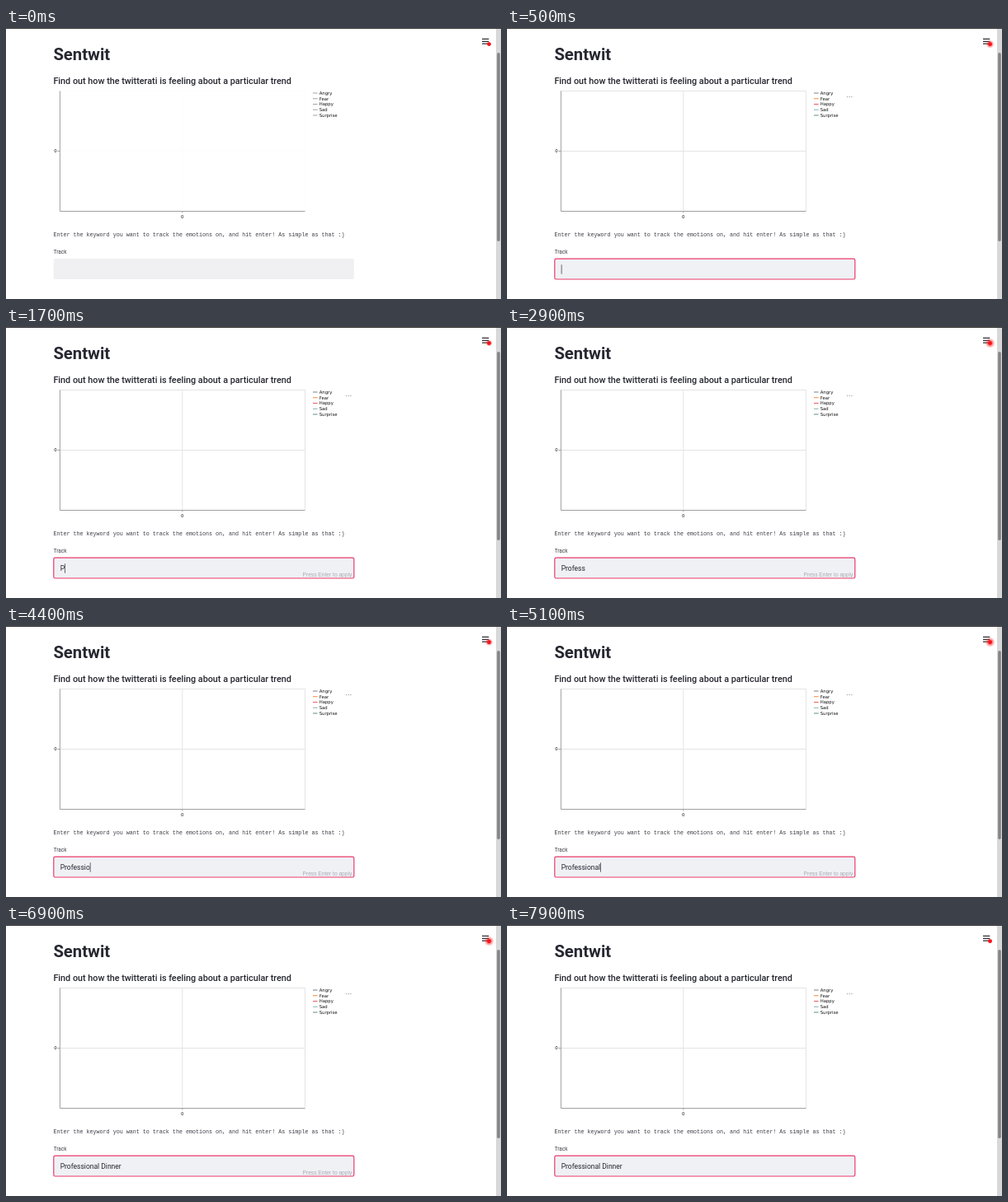
Animation, 600 px wide and 329 px high, one loop 8 s. Source, as an HTML page:

```html
<!DOCTYPE html>
<html lang="en">
<head>
<meta charset="utf-8">
<title>Sentwit</title>
<style>
  html, body { margin: 0; width: 100%; height: 100%; overflow: hidden; background: #fff; }
  svg { display: block; width: 600px; height: 329px; }
  text { fill: #262730; white-space: pre; font-family: Roboto, sans-serif; }
  .title { font-size: 20.3px; font-weight: 700; }
  .subtitle { font-size: 10.8px; font-weight: 500; }
  .prompt { font: 6.7px "Liberation Mono", monospace; fill: #3c3d45; }
  .label { font-size: 6.4px; fill: #3c3d45; }
  .typed { font-size: 8.5px; }
  .hint { font: 6.65px "Liberation Sans", sans-serif; fill: #a9abb2; text-anchor: end; }
  .chart text { font: 5.3px "DejaVu Sans", sans-serif; fill: #111; }
  .axis { stroke: #a0a0a0; fill: none; }
  .grid { stroke: #e4e4e4; fill: none; }
  .menu { stroke: #303038; stroke-width: 1.2; }
</style>
</head>
<body>
<svg viewBox="0 0 600 329">
  <defs>
    <radialGradient id="halo">
      <stop offset="0" stop-color="#f00"/>
      <stop offset=".4" stop-color="#f22" stop-opacity=".65"/>
      <stop offset="1" stop-color="#f44" stop-opacity="0"/>
    </radialGradient>
  </defs>

  <rect width="600" height="329" fill="#fff"/>
  <rect x="594" width="6" height="329" fill="#d8d8d8"/>
  <rect x="595.2" y="30" width="3.6" height="229" rx="1.8" fill="#858585"/>
  <rect width="600" height="1" fill="#383634"/>

  <text class="title" x="57.4" y="38.6">Sentwit</text>
  <text class="subtitle" x="57.4" y="68.4">Find out how the twitterati is feeling about a particular trend</text>

  <g class="chart">
    <path id="grid" class="grid" d="M65 76.5H362.5V222M65 149.5H362.5M213.8 76.5V222"/>
    <path class="axis" d="M65.4 76.5V222.5H362.5M62.5 149.5H65M213.8 222.5V224.5"/>
    <text x="61.7" y="151.4" text-anchor="end">0</text>
    <text x="213.7" y="230.8" text-anchor="middle">0</text>
    <g id="legend"></g>
    <g id="more" fill="#aaa">
      <circle cx="412.5" cy="83.6" r=".75"/>
      <circle cx="415.2" cy="83.6" r=".75"/>
      <circle cx="417.9" cy="83.6" r=".75"/>
    </g>
  </g>

  <text class="prompt" x="57.4" y="252.8">Enter the keyword you want to track the emotions on, and hit enter! As simple as that :)</text>
  <text class="label" x="57.7" y="273.7">Track</text>

  <rect id="field" x="57.8" y="280.1" width="364" height="24.9" rx="1.8" stroke-width="1.2"/>
  <text id="typed" class="typed" x="65.7" y="296"></text>
  <rect id="caret" y="287.3" width=".8" height="11.4" fill="#44454d"/>
  <text id="hint" class="hint" x="419.3" y="302.8">Press Enter to apply</text>

  <path class="menu" d="M577 13.4H585.3M577 16.3H585.3M577 19.2H585.3"/>
  <circle id="glow" cx="585.5" cy="19.6" fill="url(#halo)"/>
  <circle cx="585.5" cy="19.6" r="2.4" fill="#f4141c"/>
</svg>

<script>
const LOOP = 8000, FOCUS = 300, SUBMIT = 7500, PULSE = 2000, BLINK = 1000;
const PHRASE = "Professional Dinner";
const KEYS = [1600, 1800, 1900, 2000, 2100, 2200, 2300, 4200, 4300,
              4800, 4900, 5100, 5400, 5600, 5800, 6000, 6100, 6300, 6400];
const SERIES = [["Angry", "#6f8094"], ["Fear", "#f3883c"], ["Happy", "#e85a60"],
                ["Sad", "#86b0b0"], ["Surprise", "#5e8a8a"]];

const $ = id => document.getElementById(id);
const set = (id, attrs) => {
  for (const name in attrs) $(id).setAttribute(name, attrs[name]);
};
const show = (id, on) => set(id, { visibility: on ? "visible" : "hidden" });

$("legend").innerHTML = SERIES.map(([name], i) => {
  const y = 79 + i * 6.75;
  return `<path d="M372 ${y}h5.5"/><text x="379.7" y="${y + 1.9}">${name}</text>`;
}).join("");
const dashes = [...$("legend").querySelectorAll("path")];

function draw(t) {
  const ready = t >= 100, focused = t >= FOCUS;
  set("grid", { opacity: ready ? 1 : 0.1 });
  show("more", ready);
  dashes.forEach((dash, i) => dash.setAttribute("stroke", ready ? SERIES[i][1] : "#a2a2a2"));
  set("field", { fill: focused ? "#eff1f5" : "#f0f0f2", stroke: focused ? "#ee3a6a" : "none" });

  const pressed = KEYS.filter(key => key <= t);
  const count = pressed.length;
  const lastKey = count ? pressed[count - 1] : FOCUS;
  $("typed").textContent = PHRASE.slice(0, count);
  set("caret", { x: 65.7 + (count ? $("typed").getComputedTextLength() : 0) });
  show("caret", focused && (t - lastKey) % BLINK < BLINK / 2);
  show("hint", count > 0 && t < SUBMIT);

  const pulse = (1 - Math.cos(2 * Math.PI * t / PULSE)) / 2;
  set("glow", { r: 2.6 + 3.6 * Math.sqrt(pulse) });
}

let start;
function tick(now) {
  start ??= now;
  draw((now - start) % LOOP);
  requestAnimationFrame(tick);
}
draw(0);
requestAnimationFrame(tick);
</script>
</body>
</html>
```
